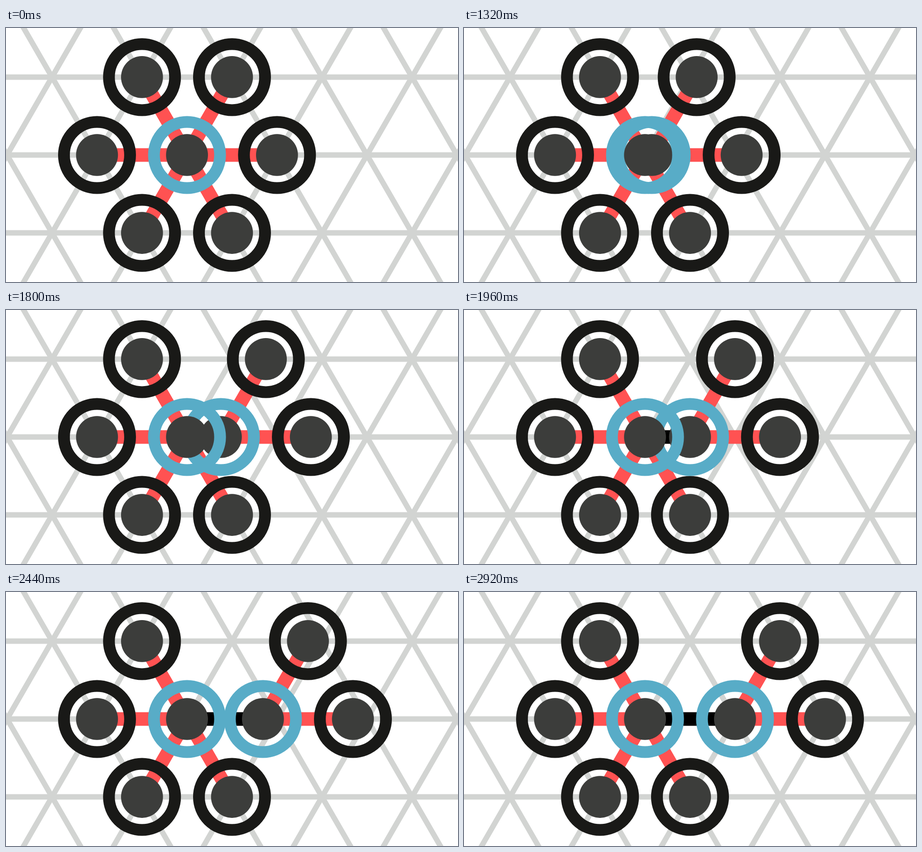
An HTML page with a canvas that plays this animation: 998 px wide and 561 px high, repeating every 3920 ms.

```html
<!DOCTYPE html>
<html lang="en">
<head>
<meta charset="utf-8">
<title>Splitting lattice cluster</title>
<style>
  html, body { margin: 0; width: 100%; height: 100%; overflow: hidden; background: #fff; }
  canvas { display: block; }
</style>
</head>
<body>
<canvas id="stage" width="998" height="561"></canvas>
<script>
const ctx = document.getElementById('stage').getContext('2d');
const W = 998, H = 561;
const SPACING = 198.7, ROW = SPACING * Math.sqrt(3) / 2;
const HUB = { x: W / 2 - SPACING / 2, y: H / 2 };
const LOOP = 3920, START = 1000, TRAVEL = 1920, STEP = 40;
const GRID = '#d2d4d2', RED = '#ff5252', BLUE = '#58acc7', BLACK = '#191917', CORE = '#3c3d3b';

// Lattice position: col and row relative to the hub, shifted sideways.
const at = (col, row, shift = 0) => ({ x: HUB.x + col * SPACING + shift, y: HUB.y + row * ROW });

const STAYING = [[-1, 0], [-0.5, -1], [-0.5, 1], [0.5, 1]];
const LEAVING = [[0.5, -1], [1, 0]];

function line(a, b, color, width) {
  ctx.strokeStyle = color;
  ctx.lineWidth = width;
  ctx.beginPath();
  ctx.moveTo(a.x, a.y);
  ctx.lineTo(b.x, b.y);
  ctx.stroke();
}

function node({ x, y }, color) {
  ctx.strokeStyle = color;
  ctx.lineWidth = 26;
  ctx.beginPath();
  ctx.arc(x, y, 73, 0, 2 * Math.PI);
  ctx.stroke();
  ctx.fillStyle = CORE;
  ctx.beginPath();
  ctx.arc(x, y, 46.3, 0, 2 * Math.PI);
  ctx.fill();
}

function drawGrid() {
  for (let row = -1; row <= 1; row++) line(at(-4, row), at(5, row), GRID, 12);
  for (let col = -5; col <= 6; col++) {
    line(at(col - 1, -2), at(col + 1, 2), GRID, 12);
    line(at(col + 1, -2), at(col - 1, 2), GRID, 12);
  }
}

function drawLinks(hub, nodes) {
  nodes.forEach(p => line(hub, p, RED, 30));
}

function draw(time) {
  const u = Math.min(1, Math.max(0, (time - START) / TRAVEL));
  const shift = SPACING * u * u * (3 - 2 * u);
  const movingHub = at(0, 0, shift);
  const staying = STAYING.map(([c, r]) => at(c, r));
  const leaving = LEAVING.map(([c, r]) => at(c, r, shift));

  ctx.fillStyle = '#fff';
  ctx.fillRect(0, 0, W, H);
  drawGrid();
  drawLinks(HUB, staying);
  drawLinks(movingHub, leaving);
  line(HUB, movingHub, '#000', 30);
  [...staying, ...leaving].forEach(p => node(p, BLACK));
  if (time >= START) node(movingHub, BLUE);
  node(HUB, BLUE);
}

function tick() {
  const time = performance.now() % LOOP;
  draw(Math.floor(time / STEP) * STEP);
  requestAnimationFrame(tick);
}
tick();
</script>
</body>
</html>
```
